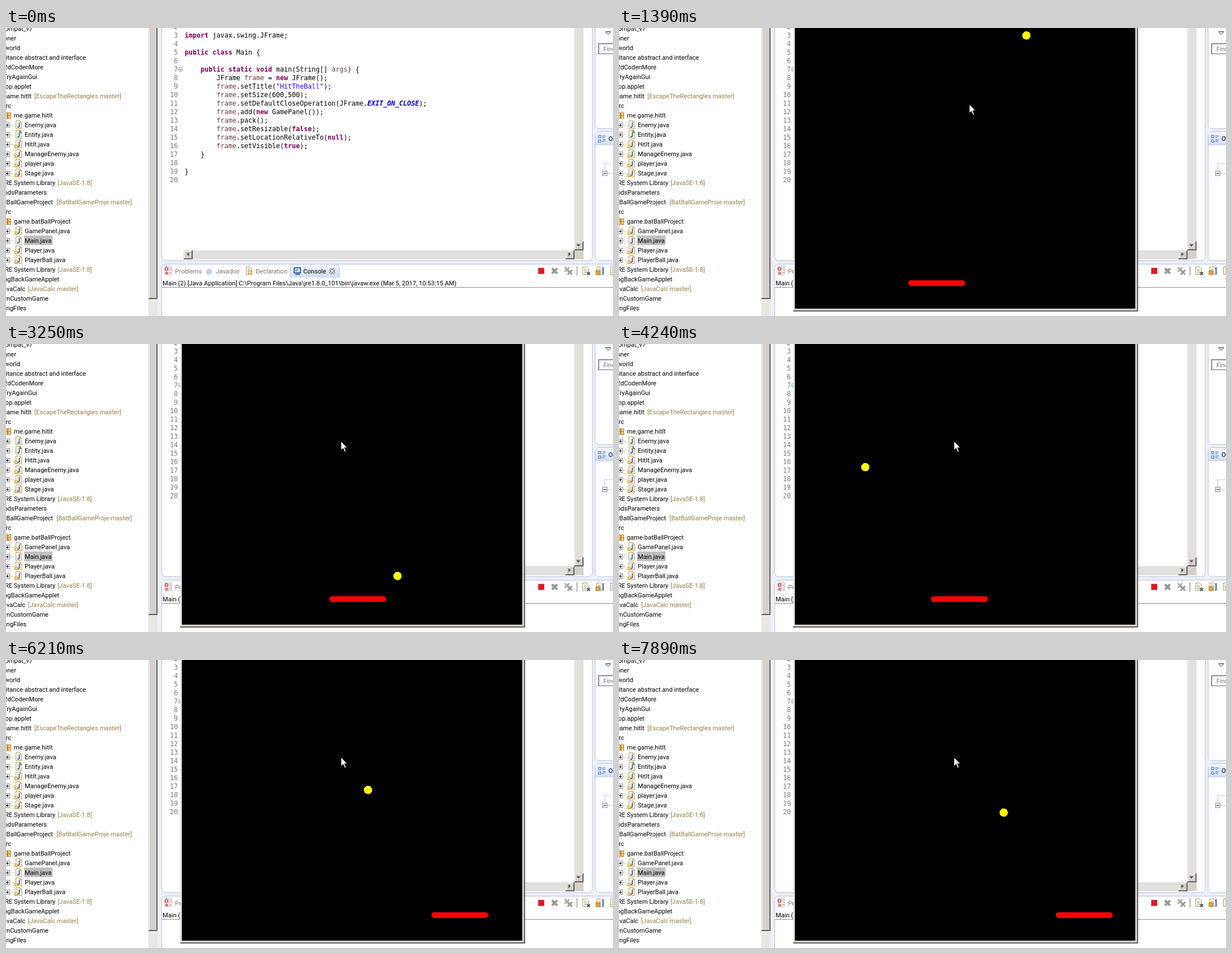
An HTML page for the animation above (8000 ms loop, 1070x508 px).

```html
<!DOCTYPE html>
<html lang="en">
<head>
<meta charset="utf-8">
<title>Bat and ball</title>
<style>
  html, body { margin: 0; width: 100%; height: 100%; overflow: hidden; background: #fff; }
  svg { display: block; width: 1070px; height: 508px; }
  text { white-space: pre; font: 11.1px Roboto, "Liberation Sans", sans-serif; }
  .code { font: 11.63px "DejaVu Sans Mono", "Liberation Mono", monospace; }
  .num { fill: #787878; text-anchor: end; }
  .kw { fill: #7f0055; font-weight: bold; }
  .str { fill: #2a00ff; }
  .var { fill: #6a3e3e; }
  .const { fill: #0000c0; font-weight: bold; font-style: italic; }
  .end { text-anchor: end; }
  .branch { fill: #957d47; }
  .dim { fill: #777; }
</style>
</head>
<body>
<svg id="stage" viewBox="0 0 1070 508" xmlns="http://www.w3.org/2000/svg"></svg>
<script>
const LOOP = 8000;
const stage = document.getElementById('stage');

const rect = (x, y, w, h, fill, extra = '') =>
  `<rect x="${x}" y="${y}" width="${w}" height="${h}" fill="${fill}" ${extra}/>`;
const path = (d, stroke, fill = 'none', width = 1) =>
  `<path d="${d}" stroke="${stroke}" fill="${fill}" stroke-width="${width}"/>`;
const text = (x, y, s, cls = '') => `<text x="${x}" y="${y}" class="${cls}">${s}</text>`;
const at = (x, y, s) => `<g transform="translate(${x} ${y})">${s}</g>`;

// Project tree
const rowY = i => 1 + 17 * i;
const expander = (x, y, mark) => rect(x - 3.5, y - 3.5, 8, 8, '#fff', 'stroke="#888"') +
  path(mark === '+' ? `M${x - 2} ${y + .5}h5M${x + .5} ${y - 2}v5` : `M${x - 2} ${y + .5}h5`, '#000');

function fileIcon(warn, letter) {
  return path('M2.5 .5h7l3 3v11h-10z', '#b89b56', '#fffdf2') +
    path('M9.5 .5v3h3', '#b89b56') +
    path('M8.5 4v6q0 2-2 2h-1.500', '#3465a4', 'none', 2) +
    (warn ? rect(0, 9, 6, 6, '#e8ab3c') + rect(2, 10, 2, 3, '#fff3c4') : '') +
    (letter ? path('M8 6l2-6 2 6M9 4h3', '#2d8c4a') : '');
}

function fileRow(i, name, warn = true) {
  const y = rowY(i);
  return expander(2, y, '+') +
    path(`M8 ${y + .5}h6`, '#999').replace('/>', ' stroke-dasharray="1 1"/>') +
    at(15, y - 8, fileIcon(warn, name === 'Entity.java')) + text(33, y + 4, name);
}

function packageRow(i, name) {
  const y = rowY(i);
  return rect(-3, y - 5, 12, 11, '#b87a2c') + rect(-2, y - 4, 4, 4, '#f3d08c') +
    rect(4, y - 4, 4, 4, '#f3d08c') + rect(-2, y + 1, 4, 4, '#f3d08c') +
    rect(4, y + 1, 4, 4, '#f3d08c') + text(14, y + 4, name);
}

function tree() {
  const rows = [
    [0, 47, 'compat_v7'], [1, 18, 'inner'], [2, 25, 'world'],
    [3, 141, 'inheritance abstract and interface'], [4, 66, '2dCodenMore'],
    [5, 55, 'TryAgainGui'], [6, 45, 'op.applet'],
    [7, 45, 'game.hitIt', 50, '[EscapeTheRectangles master]'], [8, 9, 'src'],
    [16, 87, 'JRE System Library', 91, '[JavaSE-1.8]'], [17, 72, 'odsParameters'],
    [18, 83, 'atBallGameProject', 89, '[BatBallGameProje master]'], [19, 9, 'src'],
    [25, 87, 'JRE System Library', 91, '[JavaSE-1.8]'], [26, 94, 'ingBackGameApplet'],
    [27, 34, 'avaCalc', 39, '[JavaCalc master]'], [28, 75, 'wnCustomGame'], [29, 36, 'lingFiles']
  ];
  const hitIt = ['Enemy', 'Entity', 'HitIt', 'ManageEnemy', 'player', 'Stage'];
  const batBall = ['GamePanel', 'Main', 'Player', 'PlayerBall'];
  const plain = ['Enemy', 'Entity', 'Main'];
  const files = (names, first) =>
    names.map((n, k) => fileRow(first + k, n + '.java', !plain.includes(n))).join('');
  return rect(0, 0, 251, 508, '#fff') + rect(32, 366, 50, 17, '#c0c0c0') +
    rows.map(([i, x, s, bx, b]) => text(x, rowY(i) + 4, s, 'end') +
      (b ? text(bx, rowY(i) + 4, b, 'branch') : '')).join('') +
    packageRow(9, 'me.game.hitIt') + files(hitIt, 10) +
    packageRow(20, 'game.batBallProject') + files(batBall, 21) +
    rect(251, 0, 16, 508, '#e9e7e3') + rect(251, 0, 16, 478, '#d4d0c8') +
    path('M252.500 0v476', '#fff') + path('M266.500 0v477.500h-15.500', '#404040') +
    path('M265.500 0v476.500h-13', '#808080');
}

// Editor
const codeLines = [
  [3, 315, '<k>import</k> javax.swing.JFrame;'],
  [5, 315, '<k>public</k> <k>class</k> Main {'],
  [7, 343, '<k>public</k> <k>static</k> <k>void</k> main(String[] <v>args</v>) {'],
  [8, 371, 'JFrame <v>frame</v> = <k>new</k> JFrame();'],
  [9, 371, '<v>frame</v>.setTitle(<s>"HitTheBall"</s>);'],
  [10, 371, '<v>frame</v>.setSize(600,500);'],
  [11, 371, '<v>frame</v>.setDefaultCloseOperation(JFrame.<c>EXIT_ON_CLOSE</c>);'],
  [12, 371, '<v>frame</v>.add(<k>new</k> GamePanel());'],
  [13, 371, '<v>frame</v>.pack();'],
  [14, 371, '<v>frame</v>.setResizable(<k>false</k>);'],
  [15, 371, '<v>frame</v>.setLocationRelativeTo(<k>null</k>);'],
  [16, 371, '<v>frame</v>.setVisible(<k>true</k>);'],
  [17, 343, '}'], [19, 315, '}']
];
const tokenClass = { k: 'kw', v: 'var', s: 'str', c: 'const' };
const paint = s => s.replace(/<(\w)>/g, (_, t) => `<tspan class="${tokenClass[t]}">`)
  .replace(/<\/\w>/g, '</tspan>');
const lineY = n => 17 + 15 * (n - 3);

const button = (x, y, arrow) => rect(x, y, 16, 16, '#d4d0c8') +
  path(`M${x + 1.5} ${y + 14}v-12.500h13`, '#fff') +
  path(`M${x} ${y + 15.5}h15.500v-15.500`, '#404040') +
  path(`M${x + 1} ${y + 14.5}h13.500v-13`, '#808080') +
  `<path d="${arrow}" fill="#505050" transform="translate(${x + 7.5} ${y + 7.5})"/>`;

function editor() {
  let s = rect(274.5, -20, 759, 430.5, '#fff', 'rx="7" stroke="#b4bfd6"');
  for (let n = 2; n <= 20; n++) s += text(303, lineY(n), n, 'code num');
  s += codeLines.map(([n, x, line]) => text(x, lineY(n), paint(line), 'code')).join('');
  s += '<circle cx="307.500" cy="73" r="4" fill="#e4eef9" stroke="#9db8d6"/>' +
    path('M305.500 73.500h4', '#4f7eb0');
  return s + rect(1002, 0, 16, 392, '#e2e0dc') + rect(313, 392, 689, 16, '#e2e0dc') +
    rect(1002, 392, 16, 16, '#d4d0c8') + button(1002, 376, 'M-4-2h7l-3.500 4z') +
    button(313, 392, 'M2-4v7l-4-3.500z') + button(986, 392, 'M-2-4v7l4-3.500z');
}

// Bottom view with its tabs
const cross = (x, y, r, color, width) =>
  path(`M${x - r} ${y - r}l${2 * r} ${2 * r}M${x + r} ${y - r}l${-2 * r} ${2 * r}`, color, 'none', width);
const pageIcon = path('M2.500 .5h7l3 3v10h-10z', '#a8975e', '#fffbe6') +
  path('M5 4.500h4M5 7.500h5M5 10.500h5', '#6d8bb5');

function consoleView() {
  return rect(274.5, 416.5, 830, 120, '#fff', 'rx="7" stroke="#b4bfd6"') +
    path('M501.500 440v-17q0-6.500 7-6.500h72q7 0 7 7v17', '#b4bfd6', 'url(#tab)') +
    at(279, 421, rect(1, 0, 12, 14, '#f3e9e9', 'stroke="#bbb"') +
      '<circle cx="4" cy="4" r="3.500" fill="#e0686b"/>' + cross(4, 4, 1.3, '#fff', 1) +
      rect(2, 9, 5, 5, '#d9898b') + path('M9 4.500h3M9 10.500h3', '#8b9cb8')) +
    text(298, 433, 'Problems', 'dim') +
    `<text x="353" y="433" fill="#4a7ab5">@</text>` + text(370, 433, 'Javadoc', 'dim') +
    at(421, 421, pageIcon + '<circle cx="9" cy="10" r="3.500" fill="#f2d69c" stroke="#c19645"/>') +
    text(440, 433, 'Declaration', 'dim') +
    at(507, 422, rect(1, 1, 11, 9, '#e6f1fc', 'rx="1" stroke="#2c5c9c" stroke-width="2"') +
      path('M3 4.500h6M3 6.500h4', '#2c5c9c') + path('M3 12.500h8', '#2c5c9c', 'none', 2)) +
    text(524, 433, 'Console') + cross(575, 429, 4, '#333', 4) + cross(575, 429, 4, '#fff', 2) +
    text(276, 454, 'Main (2) [Java Application] C:\\Program Files\\Java\\jre1.8.0_101\\bin\\javaw.exe (Mar 5, 2017, 10:53:15 AM)') +
    path('M275 457.500h795', '#8c8c8c') +
    rect(938.5, 423.5, 10, 10, '#e8141c', 'stroke="#b8555a"') +
    cross(967, 428.5, 4.5, '#999', 4) + cross(989, 426, 4, '#aaa', 3) + cross(994, 431, 4, '#999', 3) +
    path('M1006.500 420v17', '#777') +
    at(1014, 421, pageIcon + cross(13, 12, 2.5, '#555', 2)) +
    at(1039, 421, pageIcon + rect(1, 7, 7, 7, '#e4a43b', 'stroke="#9f7424"') +
      rect(12, 1, 3, 13, '#6688b8')) +
    at(1063, 421, pageIcon);
}

function rightViews() {
  return rect(1038.5, -20, 60, 197.5, '#fff', 'rx="7" stroke="#b4bfd6"') +
    path('M1057 6.500h9l-4.500 5z', '#333', '#fff') +
    rect(1044.5, 27.5, 40, 18, '#fff', 'stroke="#666"') + path('M1045.500 45v-16.500h30', '#bbb') +
    text(1053, 41, 'Find', 'dim') +
    rect(1038.5, 182.5, 60, 228, '#fff', 'rx="7" stroke="#b4bfd6"') +
    path('M1039 207v-18q0-6 6-6h30v24z', 'none', 'url(#tab)') +
    at(1044, 188, rect(.5, 1.5, 4, 4, '#fff', 'stroke="#2d68ad"') +
      rect(.5, 9.5, 4, 4, '#fff', 'stroke="#2d68ad"') +
      path('M7 2.500h6M7 5.500h4M7 9.500h6M7 12.500h4', '#2d68ad')) +
    text(1062, 199, 'Outline') +
    path('M1055.500 239v14M1056 239.500h14M1060 256.500h10', '#999').replace('/>', ' stroke-dasharray="1 1"/>') +
    expander(1055, 256, '-');
}

const gameWindow = `<g id="game">
  ${rect(307, -5, 608, 505, '#404040')}${rect(307, -5, 607, 504, '#808080')}
  ${rect(307, -5, 606, 503, '#d4d0c8')}${rect(308, -5, 1, 502, '#fff')}
  ${rect(310, -5, 600, 500, '#000')}
  ${rect(0, 445, 100, 10, '#f00', 'rx="5" id="paddle" shape-rendering="crispEdges"')}
  <circle id="ball" r="7.400" fill="#ff0" shape-rendering="crispEdges"/></g>`;

stage.innerHTML = `<defs><linearGradient id="tab" x2="0" y2="1">
    <stop stop-color="#f4f7fd"/><stop offset="1" stop-color="#cfdcf1"/></linearGradient></defs>` +
  rect(0, 0, 1070, 508, '#ecf0fa') + tree() + editor() + consoleView() + rightViews() + gameWindow +
  `<g id="beam">${path('M-3 -7.500h2.500M.5 -7.500h3M0 -7v14M-3 7.500h2.500M.5 7.500h3', '#000')}</g>` +
  `<g id="arrow">${path('M.5 .5v16l3.700-3.500 2.800 6.500 2.500-1-2.800-6.500h5z', '#000', '#fff')}</g>`;

const [game, paddle, ball, beam, arrow] =
  ['game', 'paddle', 'ball', 'beam', 'arrow'].map(id => document.getElementById(id));

const refreshes = [
  [0, 150, 2], [820, 1260, 4], [1390, 1390, 1], [1540, 1800, 3], [1930, 2320, 4], [2440, 2830, 4],
  [2990, 3950, 8], [4090, 4240, 2], [4370, 5020, 6], [5140, 6070, 7], [6210, 6210, 1],
  [6330, 7230, 7], [7380, 7890, 5]
].flatMap(([a, b, n]) => Array.from({ length: n }, (_, i) => n > 1 ? a + (b - a) * i / (n - 1) : a));

// Piecewise linear: each key is [position, ...values]
function along(keys, p) {
  if (p <= keys[0][0]) return keys[0].slice(1);
  const i = keys.findIndex(k => k[0] > p);
  if (i < 0) return keys[keys.length - 1].slice(1);
  const a = keys[i - 1], b = keys[i], f = (p - a[0]) / (b[0] - a[0]);
  return a.slice(1).map((v, j) => v + (b[j + 1] - v) * f);
}

const ticks = [[1390, 0], [1800, 23], [2320, 53], [2830, 82], [3950, 146], [4240, 163],
  [5020, 208], [6070, 264], [6210, 272], [7890, 368]];
const bounces = [[0, 718, 13], [46, 902, 197], [107, 658, 441], [192, 318, 101],
  [216, 414, 5], [325, 850, 441], [368, 678, 269]];
const mouse = [[700, 550, 216], [1260, 588, 144], [1390, 617, 134], [1670, 590, 171]];

// Key presses: [time, presses, direction, repeat interval], 20 px each
const presses = [[2550, 1, 1, 0], [2800, 1, 1, 0], [3100, 1, 1, 0], [4180, 1, -1, 0],
  [4680, 9, -1, 33], [5210, 1, 1, 0], [5720, 21, 1, 28], [7480, 1, -1, 0], [7700, 1, -1, 0]];
const paddleX = t => presses.reduce((x, [start, count, dir, gap]) => t < start ? x :
  x + 20 * dir * Math.min(count, gap ? 1 + Math.floor((t - start) / gap) : 1), 510);

function show(el, visible) { el.style.display = visible ? '' : 'none'; }

function render(now) {
  const time = now % LOOP;
  const t = refreshes.filter(r => r <= time).pop();
  const playing = t >= 1390;
  show(game, playing);
  show(arrow, playing);
  show(beam, t >= 150 && !playing);

  const [mx, my] = along(mouse, t).map(Math.round);
  (playing ? arrow : beam).setAttribute('transform', `translate(${mx + (playing ? 0 : .5)} ${my})`);

  const [x, y] = along(bounces, Math.round(along(ticks, t)[0]));
  ball.setAttribute('cx', x + .2);
  ball.setAttribute('cy', y + .2);
  paddle.setAttribute('x', paddleX(t));
}

const start = performance.now();
function loop() {
  render(performance.now() - start);
  requestAnimationFrame(loop);
}
loop();
</script>
</body>
</html>
```
